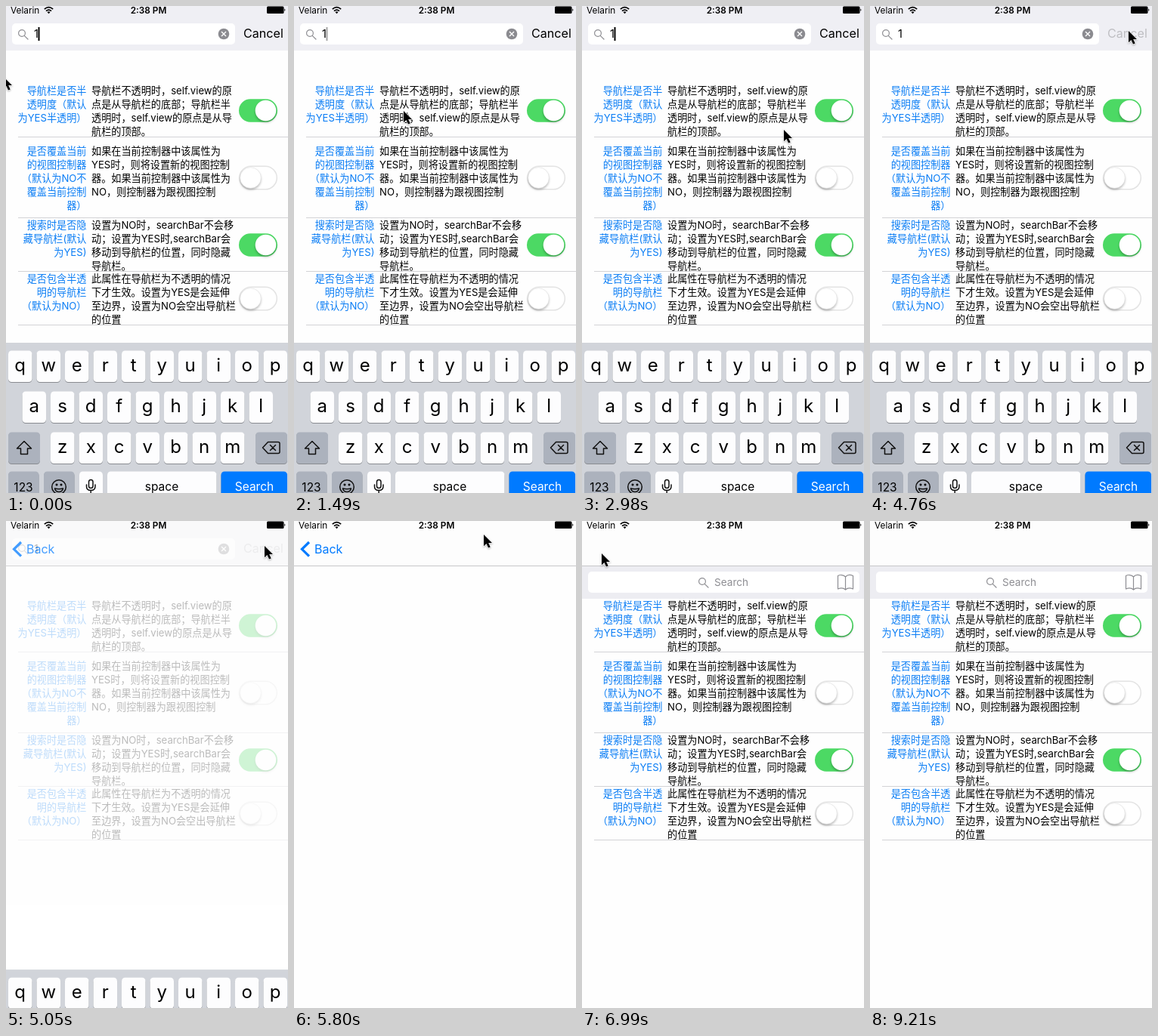
Recreate the animation shown at these times as an HTML page. Size 373x645 px, loop 9350 ms.

```html
<!DOCTYPE html>
<html lang="zh-CN">
<head>
<meta charset="utf-8">
<title>Search bar demo</title>
<style>
  html, body { margin: 0; width: 100%; height: 100%; overflow: hidden; background: #fefefe; }
  svg { display: block; width: 373px; height: 645px; }
  text { font-family: Inter, "Noto Sans CJK SC", "Noto Sans CJK", sans-serif; fill: #000; }
  .body { font-size: 13.15px; }
  .title { fill: #0a7df5; text-anchor: end; }
  .rule { stroke: #d3d3d6; }
  .knob { fill: #fff; filter: drop-shadow(0 2px 1.5px rgba(0, 0, 0, .28)); }
  .on { fill: #4cd964; }
  .off { fill: #fff; stroke: #e3e3e3; stroke-width: 1.5; }
  .key { fill: #fdfdfe; }
  .dark { fill: #acb2bd; }
  .blue { fill: #007aff; }
  .edge { fill: #898c91; }
  .letter { font-size: 24px; text-anchor: middle; }
  .label { font-size: 15.5px; text-anchor: middle; }
  .line { fill: none; stroke: #111; stroke-width: 1.5; stroke-linejoin: round; stroke-linecap: round; }
  .gray { stroke: #8e8e93; stroke-width: 1.2; }
</style>
</head>
<body>
<svg viewBox="0 0 373 645" aria-label="Search bar demo">
  <defs>
    <g id="glass" class="line gray">
      <circle cx="5" cy="5" r="4.4"/>
      <path d="M8.3 8.3L13 13"/>
    </g>
    <g id="list"></g>
  </defs>

  <rect width="373" height="645" fill="#fefefe"/>

  <g id="main">
    <rect y="60" width="373" height="585" fill="#fefefe"/>
    <rect y="60" width="373" height="43" fill="#ededf2"/>
    <rect x="8" y="67" width="359" height="28" rx="5" fill="#fff"/>
    <use href="#glass" x="154" y="75"/>
    <text x="175" y="86" font-size="13.6" style="fill:#8e8e93">Search</text>
    <path class="line gray" d="M348.5 74C346 71 341 71 338.5 72.500V90C342 88.500 346 88.500 348.500 91C351 88.500 355 88.500 358.500 90V72.500C355 71 351 71 348.500 74V91"/>
    <use href="#list"/>
  </g>

  <rect id="page" y="60" width="373" height="585" fill="#fefefe" style="filter:drop-shadow(-2px 0 3px rgba(0,0,0,.15))"/>

  <rect width="373" height="59" fill="#fdfdfd"/>
  <path d="M0 59.5H373" stroke="#c6c6c9"/>
  <g id="back">
    <path d="M20 28L10.500 37.300L20 46.600" fill="none" stroke="#007aff" stroke-width="3.2"/>
    <text x="27" y="43" font-size="16" style="fill:#007aff">Back</text>
  </g>

  <g id="search">
    <rect width="373" height="645" fill="#fefefe"/>
    <use href="#list"/>
    <rect width="373" height="59" fill="#efeff4"/>
    <rect x="8" y="23" width="295" height="28" rx="5" fill="#fff"/>
    <use href="#glass" x="16" y="31"/>
    <text x="37" y="42" font-size="14.5">1</text>
    <rect id="caret" x="42.5" y="28" width="2" height="18"/>
    <circle cx="288" cy="37" r="7.3" fill="#8b8b90"/>
    <path d="M285 34L291 40M291 34L285 40" stroke="#fff" stroke-width="1.4"/>
    <text id="cancel" x="314" y="42" font-size="16.1">Cancel</text>
  </g>

  <g id="keyboard">
    <rect y="446" width="373" height="200" fill="#d1d4da"/>
    <g id="keys"></g>
    <path class="line" d="M24 576.500L33.500 586H28.500V593.500H19.500V586H14.500Z"/>
    <path class="line" d="M339.500 585L346.500 577.500H360Q362 577.500 362 579.500V590.500Q362 592.500 360 592.500H346.500ZM349.500 581.500L356.500 588.500M356.500 581.500L349.500 588.500"/>
    <circle class="line" cx="70" cy="637" r="9.3"/>
    <path class="line" d="M64.500 639Q70 640.500 75.500 639Q74.500 643.500 70 643.500T64.500 639"/>
    <circle cx="67" cy="634" r="1.5"/>
    <circle cx="73" cy="634" r="1.5"/>
    <rect class="line" x="109.500" y="627.500" width="5.500" height="11" rx="2.750"/>
    <path class="line" d="M106.500 634V636.500Q106.500 641.500 112.200 641.500T118 636.500V634M112.200 641.500V645"/>
    <text class="label" x="23" y="642.500">123</text>
    <text class="label" x="206" y="642">space</text>
    <text class="label" x="328.500" y="642" style="fill:#fff">Search</text>
  </g>

  <g id="status">
    <text x="6" y="10" font-size="11.8">Velarin</text>
    <g fill="none" stroke="#000" stroke-width="1.7">
      <path d="M50.800 4.200Q56.500 -.8 62.200 4.200M53 6.600Q56.500 3.600 60 6.600"/>
    </g>
    <path d="M54.500 8Q56.500 6.600 58.500 8L56.500 10.300Z"/>
    <text x="188.500" y="10" font-size="11.8" font-weight="600" text-anchor="middle">2:38 PM</text>
    <rect x="345" y=".5" width="22.500" height="9.500" rx="1.500"/>
    <path d="M368.300 3.500Q370.500 5.200 368.300 7Z"/>
  </g>

  <path id="mouse" d="M0 0V15.300L3.500 12L6 17.600L8.700 16.400L6.200 11H11Z" stroke="#fff" stroke-width="1.2" paint-order="stroke" style="filter:drop-shadow(0 1px 1px rgba(0,0,0,.3))"/>
</svg>

<script>
const LOOP = 9350, TICKS = 63;
const $ = id => document.getElementById(id);

function add(parent, tag, attrs, text = '') {
  const node = document.createElementNS('http://www.w3.org/2000/svg', tag);
  for (const name in attrs) node.setAttribute(name, attrs[name]);
  node.textContent = text;
  parent.append(node);
}

const settings = [
  { y: 117, rule: 173.5, toggle: 138.5, on: true,
    title: '导航栏是否半|透明度（默认|为YES半透明）',
    note: '导航栏不透明时，self.view的原|点是从导航栏的底部；导航栏半|透明时，self.view的原点是从导|航栏的顶部。' },
  { y: 197, rule: 280.5, toggle: 227.5, on: false,
    title: '是否覆盖当前|的视图控制器|（默认为NO不|覆盖当前控制|器）',
    note: '如果在当前控制器中该属性为|YES时，则将设置新的视图控制|器。如果当前控制器中该属性为|NO，则控制器为跟视图控制' },
  { y: 295, rule: 351.5, toggle: 316.5, on: true,
    title: '搜索时是否隐|藏导航栏(默认|为YES)',
    note: '设置为NO时，searchBar不会移|动；设置为YES时,searchBar会|移动到导航栏的位置，同时隐藏|导航栏。' },
  { y: 366, rule: 422.5, toggle: 387.5, on: false,
    title: '是否包含半透|明的导航栏|（默认为NO）',
    note: '此属性在导航栏为不透明的情况|下才生效。设置为YES是会延伸|至边界，设置为NO会空出导航栏|的位置' }
];

function addLines(text, x, y, className) {
  text.split('|').forEach((line, i) =>
    add($('list'), 'text', { x, y: y + 18 * i, class: className }, line));
}

for (const s of settings) {
  const list = $('list');
  addLines(s.title, 106.5, s.y, 'body title');
  addLines(s.note, 113, s.y, 'body');
  add(list, 'path', { class: 'rule', d: `M16 ${s.rule}H373` });
  add(list, 'rect', { class: s.on ? 'on' : 'off', x: s.on ? 308 : 308.8, y: s.toggle - 15.2, width: s.on ? 51 : 49.5, height: 30.5, rx: 15.2 });
  add(list, 'circle', { class: 'knob', cx: s.on ? 343.5 : 323.5, cy: s.toggle, r: 13.8 });
  if (!s.on) add(list, 'circle', { cx: 323.5, cy: s.toggle, r: 13.8, fill: 'none', stroke: '#ddd', 'stroke-width': .6 });
}

function addKey(x, y, width, className = 'key') {
  const box = { x, width, height: 41.5, rx: 4.5 };
  add($('keys'), 'rect', { ...box, y: y + 1, class: 'edge' });
  add($('keys'), 'rect', { ...box, y, class: className });
}

[['qwertyuiop', 3, 456.5], ['asdfghjkl', 21.5, 510.5], ['zxcvbnm', 59, 564.5]].forEach(([row, left, y]) =>
  [...row].forEach((letter, i) => {
    const x = left + 37.5 * i;
    addKey(x, y, 31.5);
    add($('keys'), 'text', { class: 'letter', x: x + 15.7, y: y + 27.5 }, letter);
  }));
addKey(3, 564.5, 42, 'dark');
addKey(330, 564.5, 42, 'dark');
addKey(3, 616.5, 40.5, 'dark');
addKey(50, 616.5, 40.5, 'dark');
addKey(97, 616.5, 31);
addKey(134, 616.5, 144.5);
addKey(284.5, 616.5, 87.5, 'blue');

// Pointer stops: tick, x, y
const route = [
  [0, -3, 94], [3, 170, 120], [5, 350, 145], [7, 362, 125], [10, 145, 139],
  [13, 40, 155], [15, 1, 150], [17, 90, 150], [20, 267, 164], [22, 321, 115],
  [23, 321, 62], [25, 336, 48], [27, 342, 33], [38, 342, 33], [39, 251, 18],
  [42, 60, 36], [44, 20, 42], [46, 18, 42], [47, 26, 43], [48, 345, 400],
  [49, 205, 300], [52, 205, 300], [53, 245, 492], [54, 245, 492],
  [57, 300, 545], [60, 336, 605], [62, 338, 650]
];

const clamp = v => Math.min(1, Math.max(0, v));
const progress = (tick, from, to) => clamp((tick - from) / (to - from));
const ease = p => p * p * (3 - 2 * p);

function pointerAt(tick) {
  const next = Math.max(1, route.findIndex(stop => stop[0] >= tick));
  const [t0, x0, y0] = route[next - 1], [t1, x1, y1] = route[next];
  const p = progress(tick, t0, t1);
  return [x0 + (x1 - x0) * p, y0 + (y1 - y0) * p];
}

function caretAt(ms) {
  const phase = ms % 1000;
  return phase < 500 ? clamp((520 - phase) / 100) : clamp((phase - 850) / 100);
}

const move = (id, x, y) => $(id).setAttribute('transform', `translate(${x} ${y})`);

function draw(ms) {
  const tick = Math.min(TICKS - 1, Math.floor(ms / LOOP * TICKS));
  const dismiss = ease(progress(tick, 32, 35));
  const pop = ease(progress(tick, 43, 46));

  $('caret').style.opacity = tick < 29 ? caretAt(tick * LOOP / TICKS) : 0;
  $('cancel').style.opacity = tick < 29 ? 1 : .2;
  $('search').style.opacity = 1 - dismiss;
  move('keyboard', 0, 200 * dismiss);

  move('main', -112 * (1 - pop), 0);
  move('page', 380 * pop, 0);
  $('back').style.opacity = 1 - pop;

  move('mouse', ...pointerAt(tick));
}

let start;
function loop(now) {
  start ??= now;
  draw((now - start) % LOOP);
  requestAnimationFrame(loop);
}
draw(0);
requestAnimationFrame(loop);
</script>
</body>
</html>
```
